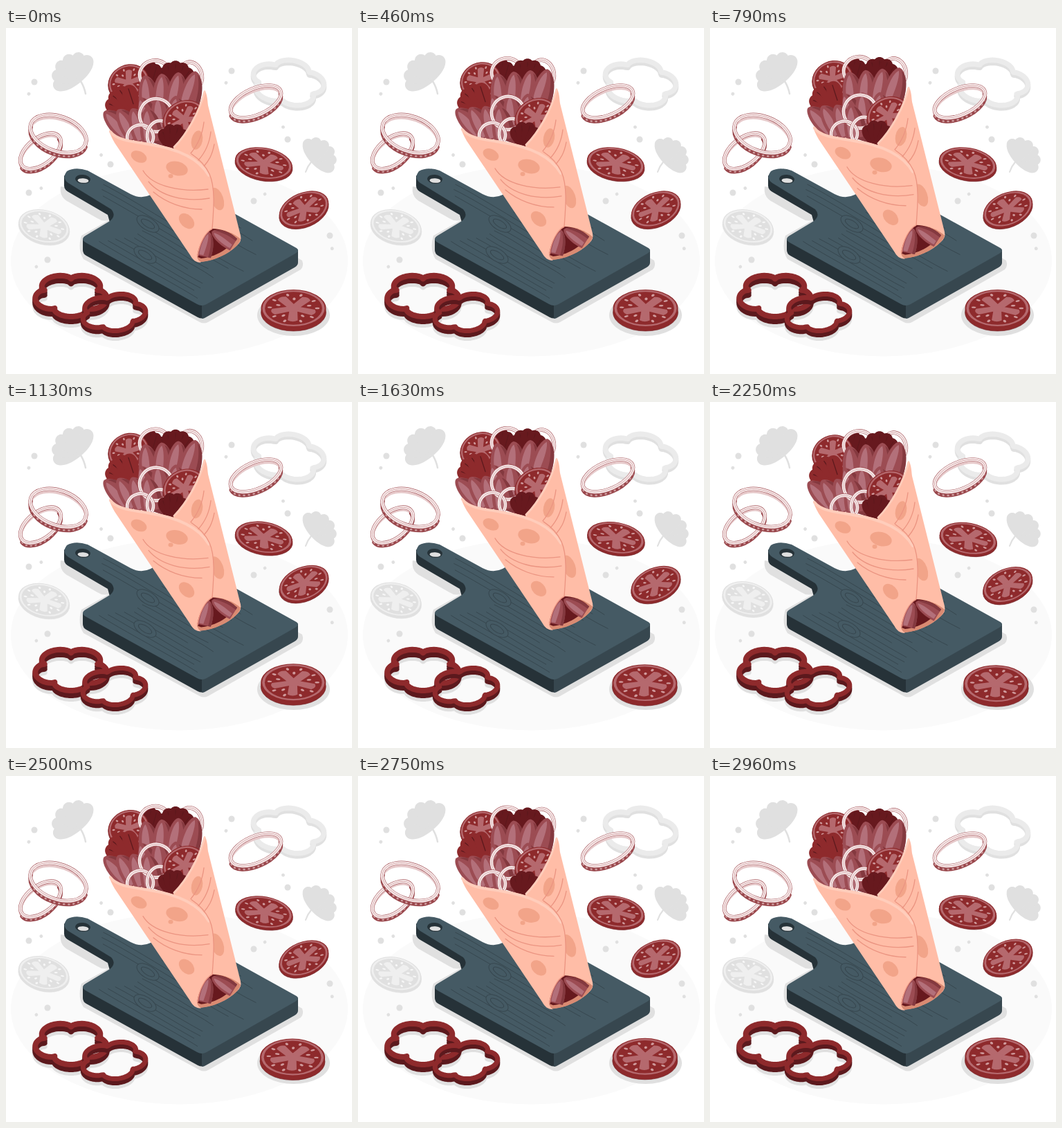
Write an HTML page that moves like this. It is 500 px wide and 500 px high and loops after 3 s.

```html
<!DOCTYPE html>
<html lang="en">
<head>
<meta charset="utf-8">
<title>Wrap on a board</title>
<style>
html, body { margin: 0; width: 100%; height: 100%; overflow: hidden; background: #fff; }
svg { display: block; width: 100%; height: 100%; }
</style>
</head>
<body>
<svg id="stage" viewBox="0 0 500 500"></svg>
<script>
const LOOP = 3000;
const GREY = '#e0e0e0', DARK = '#263238', SLATE = '#37474f', WOOD = '#455a64';
const RED = '#8e2a2c', MAROON = '#5c191d', BEET = '#67191e', FLESH = '#b5696e';
const DOUGH = '#ffbda7', CRUST = '#f2a489', FOLD = '#eb9481', GLOW = '#ffcdbb';

const range = n => [...Array(n).keys()];
const repeat = (n, make) => range(n).map(make).join('');
const path = (d, fill, extra = '') => `<path d="${d}" fill="${fill}" ${extra}/>`;
const line = (d, color, width, extra = '') =>
  path(d, 'none', `stroke="${color}" stroke-width="${width}" stroke-linecap="round" stroke-linejoin="round" ${extra}`);
const place = (x, y, rot, sx, sy, body) =>
  `<g transform="translate(${x} ${y}) rotate(${rot}) scale(${sx} ${sy})">${body}</g>`;
const oval = (x, y, rx, ry, rot, fill, extra = '') =>
  place(x, y, rot, 1, 1, `<ellipse rx="${rx}" ry="${ry}" fill="${fill}" ${extra}/>`);
const polar = (r, a, ry = r) => `${(r * Math.cos(a)).toFixed(2)} ${(ry * Math.sin(a)).toFixed(2)}`;

let seed = 7;
const random = () => (seed = (seed * 16807) % 2147483647) / 2147483647;

const RED_TOMATO = { rim: RED, edge: '#6f2024', flesh: FLESH, pocket: RED, seed: '#cf9a9c' };
const GREY_TOMATO = { rim: GREY, edge: GREY, flesh: '#efefef', pocket: GREY, seed: '#f7f7f7' };

function tomato(x, y, rx, ry, rot, depth, turn = 0.3, c = RED_TOMATO) {
  const disc = (r, fill) => `<circle r="${r}" fill="${fill}"/>`;
  const seedAt = (r, a) =>
    `<g transform="translate(${polar(r, a)}) rotate(${a * 57.3})"><ellipse rx=".07" ry=".045" fill="${c.seed}"/></g>`;
  const star = repeat(5, i => {
    const a = turn + i * Math.PI * 0.4;
    const gap = a + Math.PI * 0.2;
    return path(`M${polar(0.2, a - 0.7)}L${polar(0.66, a - 0.24)}Q${polar(0.78, a)} ${polar(0.66, a + 0.24)}L${polar(0.2, a + 0.7)}Z`, c.flesh) +
      seedAt(0.73, gap - 0.28) + seedAt(0.73, gap + 0.28) + seedAt(0.5, gap);
  });
  return oval(x, y + depth, rx, ry, rot, c.rim, `stroke="${c.edge}" stroke-width=".6"`) +
    place(x, y, rot, rx, ry, disc(1, c.rim) + disc(0.96, c.flesh) + disc(0.88, c.pocket) + disc(0.22, c.flesh) + star);
}

// Far inner wall is pale, near outer wall is red
function onion(x, y, rx, ry, rot, depth, band = 4.5) {
  const half = sweep => `M${-rx} 0A${rx} ${ry} 0 0 ${sweep} ${rx} 0`;
  const wall = (dy, body) => place(x, y + dy, rot, 1, 1, body);
  const ring = (color, width) => oval(x, y, rx, ry, rot, 'none', `stroke="${color}" stroke-width="${width}"`);
  const walls = depth ? wall(depth * 0.8, line(half(1), '#e6c9ca', band)) +
    wall(depth, line(half(0), '#99464b', band + 1) + line(half(0), '#cf9fa1', band - 2, 'stroke-dasharray="1 6"')) : '';
  return walls + ring('#a85a5f', band + 1.2) + ring('#f6eaea', band) + ring('#d9adaf', 0.9);
}

// Five-lobed ring
function pepper(x, y, rx, ry, phase, tilt, top, wall, width, depth) {
  const points = range(100).map(i => {
    const a = i * Math.PI / 50;
    const r = 0.76 + 0.24 * Math.abs(Math.cos(2.5 * (a - phase))) ** 0.6;
    return polar(rx * r, a, ry * r);
  });
  const at = (dy, color) => place(x, y + dy, tilt, 1, 1, line(`M${points.join('L')}Z`, color, width));
  return at(depth, wall) + at(depth / 2, wall) + at(0, top);
}

// Petals spreading from a pivot
function fan(x, y, size, angle, spread, count, color, vein) {
  return repeat(count, i => {
    const k = 2 * i / (count - 1) - 1;
    const petal = path('M0 0C-.12-.2-.27-.55-.2-.8C-.14-1.03.14-1.03.2-.8C.27-.55.12-.2 0 0Z', color);
    const stripe = vein ? line('M0-.35L0-.85', vein, 0.025) : '';
    return place(x, y, angle + spread * k, size, size * (1 - 0.1 * k * k), petal + stripe);
  });
}

function meat(x, y, w, h, rot) {
  return place(x, y, rot, w, h,
    path('M-.5 .55C-.62 0-.3-.5-.04-.52C.3-.5.62 0 .5 .55Z', '#9c4c53') +
    path('M-.36 .5C-.42 0-.2-.38-.03-.42C.1-.2 0 .2-.06 .5Z', '#b3707a') +
    path('M.3 .55C.38 .1.28-.2.1-.44C.46-.32.6.1.5 .55Z', '#84393f'));
}

const leaf = fan(-7, -17, 46, -40, 57, 6, GREY) + line('M-7-18Q-2-10 0 0', GREY, 2.5);

// Each large dot has a small companion in the given direction (degrees)
const dots = [[41, 78, 115], [326, 62, 115], [407, 161, 250], [151, 197, 225], [33, 238, -20], [358, 250, -32],
  [468, 300, 80], [60, 335, 148]].map(([x, y, deg]) =>
  oval(x, y, 4.5, 4.5, 0, GREY) + place(x, y, deg, 1, 1, oval(19, 0, 2.4, 2.4, 0, GREY))).join('');

const backdrop = oval(250.5, 336.5, 243.5, 138, 0, '#fafafa') + dots +
  place(115, 95, 0, 1, 1, leaf) + place(433, 208, 8, -0.86, 0.86, leaf) +
  pepper(407, 79, 53, 33, 1.05, 8, '#ebebeb', GREY, 7.5, 4);

// u runs along the board, v across it
const onBoard = (u, v) => `${(113 + 0.866 * (u + v)).toFixed(1)} ${(306 + 0.5 * (u - v)).toFixed(1)}`;
const grain = repeat(17, i => {
  const v = 10 + i * 8.6;
  const from = v > 72 && v < 104 ? -75 + random() * 30 : 15 + random() * 30;
  const to = 110 + random() * 75;
  const bend = random() * 10 - 5;
  return line(`M${onBoard(from, v)}C${onBoard(from + 40, v + bend)} ${onBoard(to - 40, v - bend)} ${onBoard(to, v)}`, SLATE, 1);
});
const knot = (x, y) => oval(x, y, 18, 9, 32, WOOD, `stroke="${SLATE}"`) + oval(x, y, 11, 4.5, 32, 'none', `stroke="${SLATE}"`);

const board =
  path('M79 229Q77 243 88 250L132 275Q141 281 150 277L109 300Q103 320 112 334L280 425Q286 428 292 425L426 349Q431 344 428 336L400 320L140 240Z', GREY) +
  path('M84 213V228Q84 234 92 238L147 270L150 281L111 305V321Q111 326 116 329L277 418Q283 421 288 418L300 390L150 255Z', DARK) +
  path('M283 400L422 320V339Q422 343 417 346L289 418Q286 420 283 420Z', SLATE) +
  path('M88 207Q100 200 118 206L180 240Q195 248 209 241L235 226Q245 221 254 226L418 317Q426 321 418 326' +
    'L290 399Q283 403 276 399L115 310Q107 305 115 300L150 279Q160 271 152 262L90 224Q80 217 88 207Z', WOOD) +
  grain + knot(205, 283) + knot(201, 328) +
  oval(111, 218.5, 11, 6.5, 4, DARK) + oval(111.5, 220.5, 8, 3.3, 4, GREY);

const filling =
  path('M152 145L165 85L205 66L262 62L282 95L240 175Z', '#84393f') +
  onion(267, 69, 16, 20, -15, 0) +
  fan(209, 86, 40, 0, 16, 3, BEET, MAROON) +
  tomato(177, 79, 30, 26, -25, 1, 0.1) +
  onion(215, 67, 22, 20, -10, 0) +
  fan(245, 92, 46, 0, 34, 5, BEET, MAROON) +
  repeat(4, i => meat(206 + 21 * i, 93 - 2 * i, 30, 48, -10 + 8 * i)) +
  repeat(3, i => meat(202 + 22 * i, 121, 30, 44, -22 + 12 * i)) +
  fan(189, 125, 51, -52, 34, 5, RED, MAROON) +
  repeat(4, i => meat(160 + 16 * i, 136 + i, 30, 46, -48 + 13 * i)) +
  onion(217, 126, 24, 24, -20, 0) + onion(194, 158, 19, 18, -15, 0) + onion(222, 155, 18, 21, 5, 0) +
  tomato(258, 132, 32, 27, -25, 1, 0.5) +
  fan(241, 180, 43, 2, 28, 4, BEET, MAROON);

const blot = (x, y, rx, ry, rot) => oval(x, y, rx, ry, rot, CRUST);
const tortilla =
  path('M287 90C291 96 291 104 292 112L339 300Q341 308 334 314C320 328 300 336 280 338L252 280L242 174C262 153 280 119 287 90Z', DOUGH) +
  line('M287 92C280 120 262 153 243 172', GLOW, 3) +
  blot(276, 162, 8, 14, 12) + blot(305, 247, 9, 17, -20) +
  line('M286 136C284 153 277 169 267 181M296 150C294 167 287 181 278 191M301 168C298 184 293 192 285 201', FOLD, 1.3) +
  path('M276 330C277 312 284 296 295 290C312 289 329 296 339 305C336 319 304 337 282 338Q276 337 276 330Z', '#d98a72') +
  path('M277 331C278 311 286 297 297 290C311 290 324 295 331 302C327 318 302 331 282 333Z', BEET) +
  meat(290, 312, 20, 34, 12) + meat(313, 303, 20, 34, -58) +
  path('M149 147C160 163 184 163 206 167C246 172 279 184 294 211C303 231 300 264 298 291C287 296 279 313 276 330' +
    'Q277 336 282 339C274 339 270 335 266 328L157 166Q150 154 149 147Z', DOUGH) +
  line('M151 150C161 163 184 164 206 168C246 174 278 187 293 213', GLOW, 4) +
  line('M268 182Q286 194 294 211C303 231 300 264 298 290C288 295 279 312 277 330', FOLD, 1.3) +
  blot(192, 186, 12, 8, 25) + blot(247, 203, 16, 10, 15) + blot(238, 214, 3.5, 3, 0) + blot(261, 279, 13, 9, 45) +
  line('M198 206C211 229 254 238 292 233M206 222C223 243 258 252 294 246M213 237C231 252 256 262 283 262', FOLD, 1.3);

const ring = (dy, top, wall) =>
  pepper(94, 386 + dy, 53, 31, Math.PI / 2, 0, top, wall, 8, 7) +
  pepper(155, 411 + dy, 47, 27, 1.4, -5, top, wall, 7, 6);

const tomatoes =
  tomato(372.5, 195.5, 42, 22.5, 10, 3, 0.2) +
  tomato(430.5, 261.5, 37.5, 23.5, -23, 3, 0.7) +
  tomato(415.5, 405, 47, 27, 0, 6, 0.35) +
  tomato(55, 286.5, 37.5, 23.5, 14, 3, 0.2, GREY_TOMATO);

document.getElementById('stage').innerHTML = backdrop + board +
  onion(50, 178, 34, 19, -38, 4) + onion(75.5, 153, 42, 25, 20, 5) + onion(361, 106.5, 39, 19, -24, 5) +
  ring(5, GREY, GREY) + ring(0, RED, MAROON) + oval(415.5, 415, 52.5, 30, 0, GREY) +
  `<g id="tomatoes">${tomatoes}</g><g id="wrap">${filling}${tortilla}</g>`;

const wrapNode = document.getElementById('wrap');
const tomatoNode = document.getElementById('tomatoes');

function draw(now) {
  const t = now % LOOP;
  const lift = 10 * (1 - Math.abs(t / (LOOP / 2) - 1));
  const sway = Math.max(0, Math.min((t - 1000) / 1250, (LOOP - t) / 750));
  wrapNode.setAttribute('transform', `translate(0 ${-lift})`);
  tomatoNode.setAttribute('transform', `rotate(${0.8 * sway} 250 250)`);
}

const start = performance.now();
function tick() {
  draw(performance.now() - start);
  requestAnimationFrame(tick);
}
tick();
</script>
</body>
</html>
```
